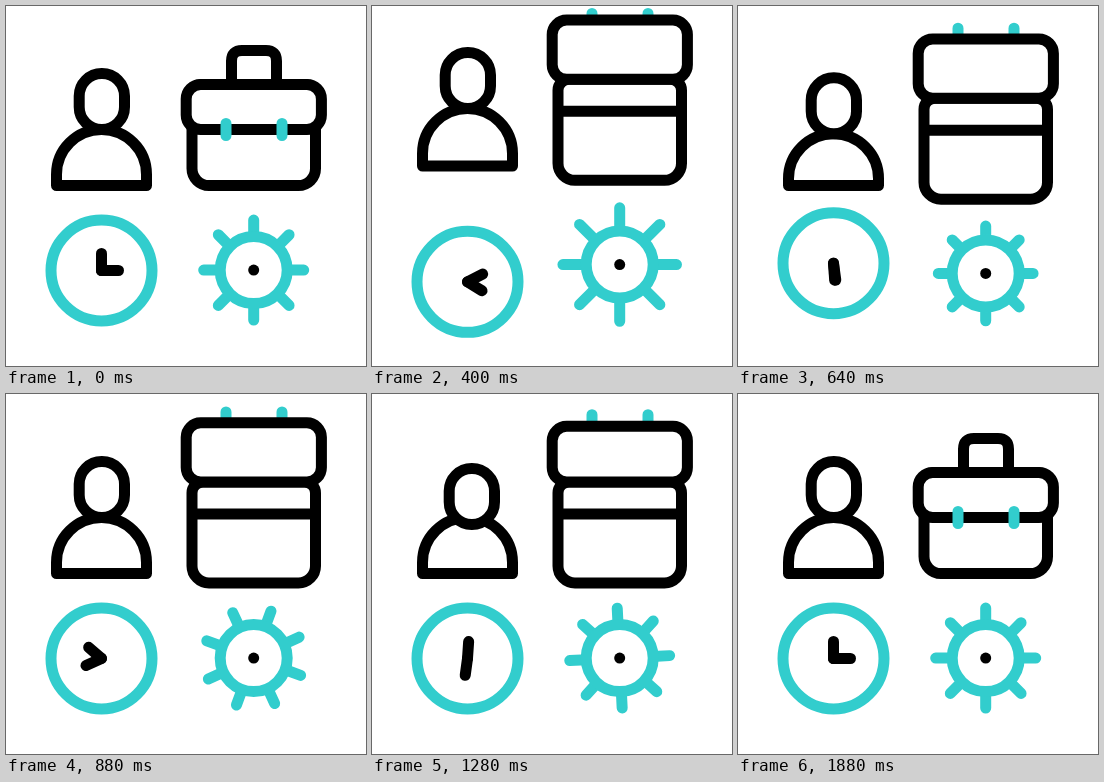
Animation, 360 px wide and 360 px high, one loop 2000 ms. Source, as an HTML page:

```html
<!DOCTYPE html>
<html lang="en">
<head>
<meta charset="utf-8">
<title>Work time icons</title>
<style>
  html, body { margin: 0; width: 100%; height: 100%; overflow: hidden; background: #fff; }
  svg { display: block; width: 100vw; height: 100vh; }
  .ink, .teal { fill: #fff; stroke: #000; stroke-width: 11; stroke-linecap: round; stroke-linejoin: round; }
  .teal { stroke: #32cdcd; }
</style>
</head>
<body>
<svg viewBox="0 0 360 360">
  <path id="torso" class="ink"/>
  <rect id="head" class="ink" x="73.2" y="67.5" width="45.3" height="56" rx="22.5"/>

  <g id="bag">
    <path class="ink" d="M225.5 78V55q0-10.5 10.5-10.5h24q10.5 0 10.5 10.5V78"/>
    <path id="latchBack" class="teal"/>
    <path class="ink" d="M186 89.5V162.5a17 17 0 0 0 17 17h89.500a17 17 0 0 0 17-17V89.5a11 11 0 0 0-11-11H197a11 11 0 0 0-11 11Z"/>
    <path class="ink" d="M189 110.5H306"/>
    <rect id="flap" class="ink" x="180.2" width="135.2"/>
    <path id="latchFront" class="teal"/>
  </g>

  <g id="clock">
    <circle class="teal" r="50.5"/>
    <path id="minute" class="ink" d="M0 0V-17"/>
    <path id="hour" class="ink" d="M0 0V-17"/>
  </g>

  <g id="gear">
    <path id="spokes" class="teal"/>
    <circle class="teal" r="33.5"/>
    <circle r="5.5"/>
  </g>
</svg>
<script>
const LOOP = 2000, STEP = 40, HINGE = 78.5;
const $ = id => document.getElementById(id);
const set = (id, name, value) => $(id).setAttribute(name, value);
const move = (id, x, y) => set(id, "transform", `translate(${x} ${y})`);
const turn = (id, angle) => set(id, "transform", `rotate(${angle})`);

// Eased value at t through [time, value] keys.
function track(t, ...keys) {
  if (t <= keys[0][0]) return keys[0][1];
  for (let i = 1; i < keys.length; i++) {
    const [t0, a] = keys[i - 1], [t1, b] = keys[i];
    if (t < t1) {
      const u = (t - t0) / (t1 - t0);
      return a + (b - a) * u * u * (3 - 2 * u);
    }
  }
  return keys[keys.length - 1][1];
}

const bounce = (t, peak, rebound) =>
  track(t, [80, 0], [320, peak], [620, rebound], [760, 0]);

function drawPerson(t) {
  const nod = track(t, [880, 0], [1200, 1], [1600, 1], [1840, 0]);
  const lift = bounce(t, -26.5, 4.5);
  const base = 179.5 + bounce(t, -23.5, 0);
  // The shoulders follow the head, so the torso stretches and squashes.
  const shoulder = 168.5 + lift;
  set("torso", "d", `M50.5 ${base}V${shoulder}a45 45 0 0 1 90 0V${base}Z`);
  move("head", 4 * nod, lift + 7 * nod);
}

function drawBag(t) {
  move("bag", 0, track(t, [80, 0], [320, -9.3], [620, 13.9], [760, 9.4], [1560, 9.4], [1790, 0]));
  const edge = track(t, [80, 45], [400, -59.2], [1220, -59], [1770, 45]);
  const height = Math.abs(edge);
  set("flap", "y", HINGE + Math.min(edge, 0));
  set("flap", "height", Math.max(height, 0.1));
  set("flap", "rx", Math.min(14.5, height / 2));

  const tip = track(t, [80, 51], [440, -70], [1230, -70], [1785, 51]);
  const from = HINGE + tip * 39 / 51, to = HINGE + tip;
  const latches = [220, 276].map(x => `M${x} ${from}V${to}`).join("");
  set("latchFront", "d", edge > 0 ? latches : "");
  set("latchBack", "d", edge > 0 ? "" : latches);
}

function drawClock(t) {
  const turned = track(t, [80, 0], [1840, 360]);
  move("clock", 95.5, 264.5 + bounce(t, 15.4, -7.7));
  turn("minute", 2 * turned);
  turn("hour", 90 + turned);
}

function drawGear(t) {
  const reach = 50 + bounce(t, 8.8, -2.8);
  let d = "";
  for (let i = 0; i < 8; i++) {
    const c = Math.cos(i * Math.PI / 4), s = Math.sin(i * Math.PI / 4);
    d += `M${33 * c} ${33 * s}L${reach * c} ${reach * s}`;
  }
  set("spokes", "d", d);
  turn("spokes", track(t, [727, 0], [1640, 270]));
  move("gear", 247.7, 264.1 + bounce(t, -7.5, 3.5));
}

function render(now) {
  const t = Math.floor((now % LOOP) / STEP) * STEP;
  drawPerson(t);
  drawBag(t);
  drawClock(t);
  drawGear(t);
}

const start = performance.now();
function tick() {
  render(performance.now() - start);
  requestAnimationFrame(tick);
}
tick();
</script>
</body>
</html>
```
